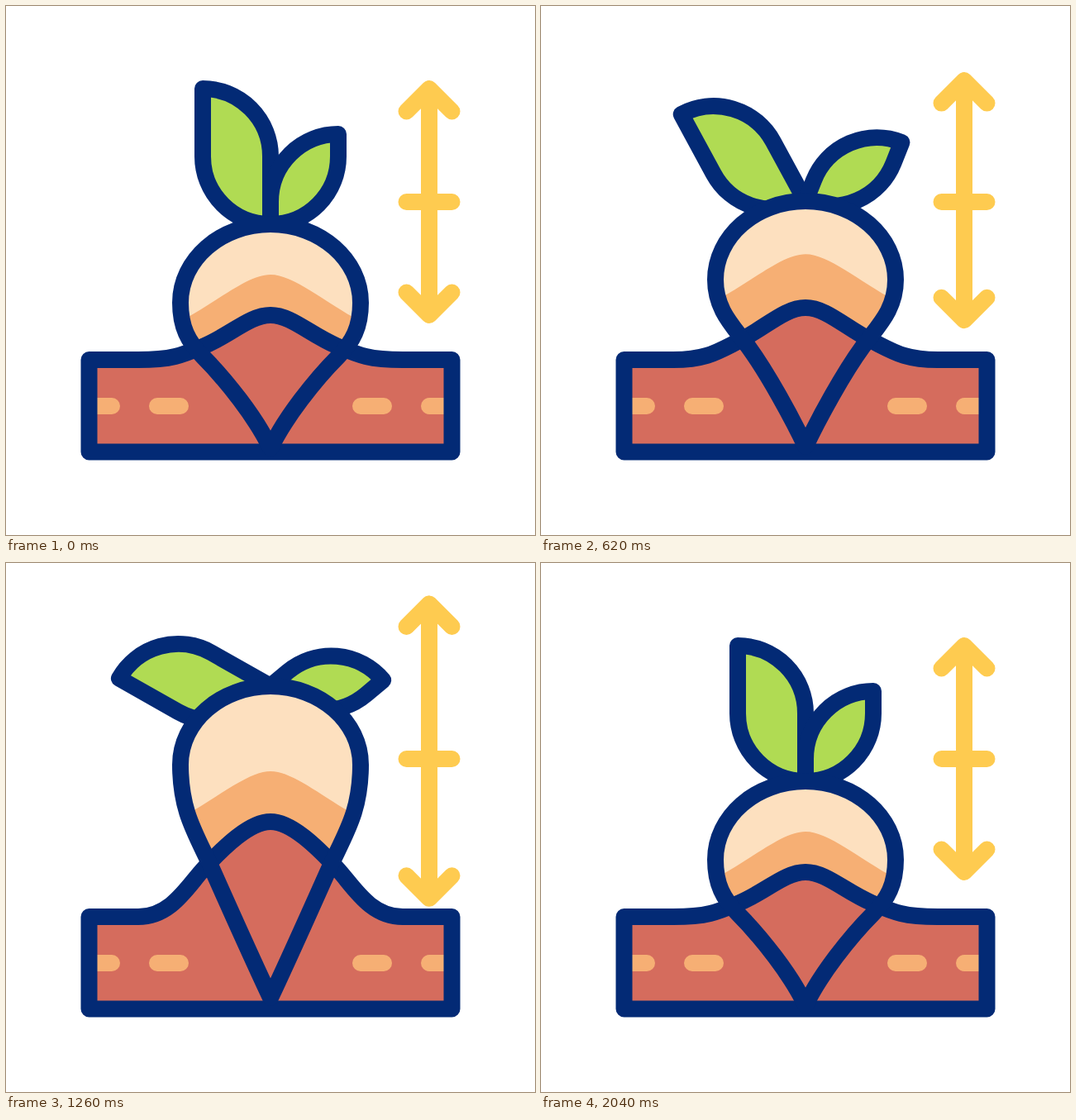
Recreate the animation shown at these times as an HTML page. Size 640 by 640 pixels, loop 2400 ms.

```html
<!DOCTYPE html>
<html lang="en">
<head>
<meta charset="utf-8">
<title>Pulling a turnip</title>
<style>
html, body { margin: 0; width: 100%; height: 100%; overflow: hidden; background: #fff }
svg { display: block; width: 100vw; height: 100vh }
.line { stroke: #032a75 }
</style>
</head>
<body>
<svg viewBox="0 0 640 640" fill="none" stroke-width="20" stroke-linecap="round" stroke-linejoin="round">
  <clipPath id="clip"><path id="mask"/></clipPath>
  <g class="line" fill="#b0db53">
    <path id="leftLeaf" d="M0 0V-82A82 82 0 0 0 -82 -164V-82A82 82 0 0 0 0 0Z"/>
    <path id="rightLeaf" d="M0 0V-27A82 82 0 0 1 82 -109V-82A82 82 0 0 1 0 0Z"/>
  </g>
  <path id="body" fill="#fde0bf"/>
  <path id="shade" fill="#f6af74" clip-path="url(#clip)"/>
  <path id="soil" fill="#d56c5d"/>
  <path stroke="#f6af74" d="M106 484H128M183 484H211M429 484H457M512 484H534"/>
  <path id="ridge" class="line"/>
  <path id="outline" class="line"/>
  <path id="arrow" stroke="#fecb50"/>
</svg>
<script>
const LOOP = 2400, END = 2040;
const $ = id => document.getElementById(id);

// Two tugs: a short one that slips back, then a long one that lets go.
const rest = { top: 264, peak: 374, band: 325, left: 0, right: 0 };
const poses = [
  { t: 0, ...rest },
  { t: 440, top: 228, peak: 356, band: 284, left: 30, right: 26 },
  { t: 800, top: 244, peak: 374, band: 316, left: 27, right: 16.7 },
  { t: 1020, top: 187, peak: 335, band: 273, left: 27.8, right: 15.8 },
  { t: 1260, top: 149, peak: 313, band: 252, left: 60.5, right: 50 },
  { t: 1580, top: 182, peak: 321, band: 260, left: 24.2, right: 20 },
  { t: END, ...rest }
];
const stretch = [[0, 0], [300, -10], [1140, 51], [1580, 46], [END, 0]];

// Monotone cubic interpolation, at rest at both ends and at turning points.
function sample(keys, t) {
  const last = keys.length - 1;
  if (t >= keys[last][0]) return keys[last][1];
  const slope = i => (keys[i + 1][1] - keys[i][1]) / (keys[i + 1][0] - keys[i][0]);
  const tangent = i => {
    if (i === 0 || i === last) return 0;
    const a = slope(i - 1), b = slope(i);
    return a * b > 0 ? 2 * a * b / (a + b) : 0;
  };
  let i = 0;
  while (t >= keys[i + 1][0]) i++;
  const [[t0, v0], [t1, v1]] = keys.slice(i, i + 2);
  const span = t1 - t0, u = (t - t0) / span, w = 1 - u;
  return w * w * ((1 + 2 * u) * v0 + u * span * tangent(i)) +
    u * u * ((3 - 2 * u) * v1 - w * span * tangent(i + 1));
}

// Cubic path from the left half of its points, mirrored about x = 320.
function mirrored(half) {
  const other = half.slice(0, -1).reverse().map(([x, y]) => [640 - x, y]);
  const [first, ...points] = [...half, ...other];
  return `M${first}C${points.join(" ")}`;
}

const radians = degrees => degrees * Math.PI / 180;

// The deeper the turnip sits, the more its root flares out below the bend.
function turnip(top) {
  const depth = (top - 149) / 115, wide = top + 95;
  const x = 251 - 13 * depth ** 12, y = 374 + 50 * depth, tip = 526 + 9 * depth;
  const angle = radians(24 + 21 * depth ** 2), sin = Math.sin(angle), cos = Math.cos(angle);
  const reach = (y - wide) * 0.38;
  return mirrored([
    [320, top], [260, top], [211, wide - 52], [211, wide],
    [211, wide + reach * 1.2], [x - sin * reach, y - cos * reach], [x, y],
    [x + sin * 40, y + cos * 40], [303, tip - 36], [320, tip]
  ]) + "Z";
}

// The mound steepens as its peak is lifted.
function ground(peak) {
  const sink = peak - 313, y = 369 + sink * 0.69;
  const angle = radians(47 - sink * 0.39), cos = Math.cos(angle), sin = Math.sin(angle);
  return mirrored([
    [160, 428], [200, 428], [240 - cos * 30, y + sin * 30], [240, y],
    [240 + cos * 36, y - sin * 36], [295, peak], [320, peak]
  ]) + "H539.5V539.5H100.5V428Z";
}

function draw(t) {
  const pose = {};
  for (const name in rest) pose[name] = sample(poses.map(p => [p.t, p[name]]), t);
  const { top, peak, band, left, right } = pose;

  const shape = turnip(top), earth = ground(peak);
  for (const id of ["mask", "body", "outline"]) $(id).setAttribute("d", shape);
  for (const id of ["soil", "ridge"]) $(id).setAttribute("d", earth);
  $("shade").setAttribute("d", mirrored([
    [200, band + 62], [250, band + 38], [290, band], [320, band]
  ]) + "V560H200Z");
  $("leftLeaf").setAttribute("transform", `translate(320 ${top}) rotate(${-left})`);
  $("rightLeaf").setAttribute("transform", `translate(320 ${top}) rotate(${right})`);

  const grow = sample(stretch, t), up = 100 - grow, down = 374 + grow * 0.63;
  const head = (y, arm) => `M484.5 ${y + arm}L512 ${y}L539.5 ${y + arm}`;
  $("arrow").setAttribute("d",
    `M512 ${up}V${down}M484.5 237H539.5` + head(up, 27.5) + head(down, -27.5));
}

const start = performance.now();
function tick() {
  draw((performance.now() - start) % LOOP);
  requestAnimationFrame(tick);
}
tick();
</script>
</body>
</html>
```
